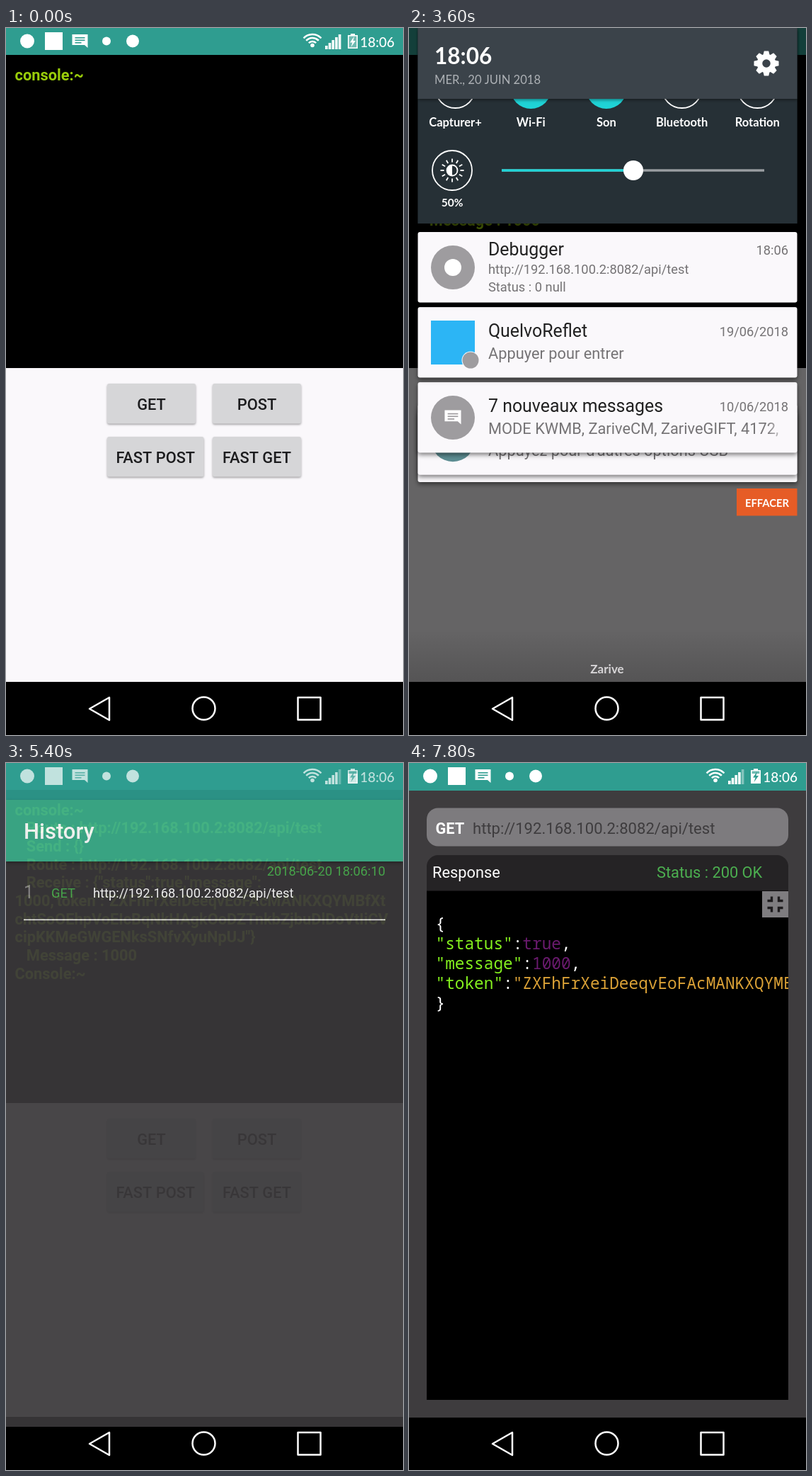
These frames come from a looping animation (561x998 px, 8 s). An HTML page with a canvas:

```html
<!DOCTYPE html>
<html lang="fr">
<head>
<meta charset="utf-8">
<title>Console</title>
<style>
html, body { margin: 0; width: 100%; height: 100%; overflow: hidden; background: #000; }
canvas { display: block; width: 100vw; height: 100vh; }
</style>
</head>
<body>
<canvas id="stage" width="561" height="998"></canvas>
<script>
const W = 561, H = 998, NAV = 923, BAR = 38;
const LOOP = 8000, STEP = 200;
const TEAL = '#2f9d90', PAPER = '#faf8fb', GREEN = '#4caf50', CYAN = '#1fd3d6', SLATE = '#3e3c3e';
const ROBOTO = 'Roboto, sans-serif', ROUND = 'Lato, sans-serif', MONO = '"Noto Sans Mono", monospace';
const URL_TEXT = 'http://192.168.100.2:8082/api/test';
const TOKEN = 'ZXFhFrXeiDeeqvEoFAcMANKXQYMBfXt';

const screen = document.getElementById('stage').getContext('2d');
const layer = document.createElement('canvas');
layer.width = W;
layer.height = H;
const layerCtx = layer.getContext('2d');
let c = screen;

const clamp = (v, a, b) => Math.max(a, Math.min(b, v));

// Linear interpolation through [time, value] pairs
function track(keys, t) {
  if (t <= keys[0][0]) return keys[0][1];
  for (let i = 1; i < keys.length; i++) {
    const [t0, v0] = keys[i - 1], [t1, v1] = keys[i];
    if (t <= t1) return v0 + (v1 - v0) * (t - t0) / (t1 - t0);
  }
  return keys[keys.length - 1][1];
}

function text(s, x, y, size, color, { weight = 400, font = ROBOTO, align = 'left' } = {}) {
  c.font = `${weight} ${size}px ${font}`;
  c.textAlign = align;
  c.fillStyle = color;
  c.fillText(s, x, y);
}

function rect(x, y, w, h, color) {
  c.fillStyle = color;
  c.fillRect(x, y, w, h);
}

function rounded(x, y, w, h, r, color) {
  c.beginPath();
  c.roundRect(x, y, w, h, r);
  c.fillStyle = color;
  c.fill();
}

function disc(x, y, r, color) {
  c.beginPath();
  c.arc(x, y, r, 0, Math.PI * 2);
  c.fillStyle = color;
  c.fill();
}

function ring(x, y, r, width, color) {
  c.beginPath();
  c.arc(x, y, r, 0, Math.PI * 2);
  c.lineWidth = width;
  c.strokeStyle = color;
  c.stroke();
}

function path(points, close) {
  c.beginPath();
  points.forEach(([x, y]) => c.lineTo(x, y));
  if (close) c.closePath();
}

function withShadow(blur, dy, alpha, draw) {
  c.save();
  c.shadowColor = `rgba(0,0,0,${alpha})`;
  c.shadowBlur = blur;
  c.shadowOffsetY = dy;
  draw();
  c.restore();
}

function clipped(x, y, w, h, draw) {
  c.save();
  c.beginPath();
  c.rect(x, y, w, h);
  c.clip();
  draw();
  c.restore();
}

function speech(x, y, s, color, lines) {
  c.save();
  c.translate(x, y);
  c.scale(s, s);
  path([[-11, -9], [11, -9], [11, 10], [6.5, 6], [-11, 6]], true);
  c.fillStyle = color;
  c.fill();
  [-5, -1.5, 2].forEach((dy, i) => rect(-7, dy, i === 2 ? 9 : 14, 1.6, lines));
  c.restore();
}

function battery(step) {
  const charged = step % 3 === 1;
  rect(487, 8, 6, 3, '#fff');
  c.lineWidth = 1.6;
  c.strokeStyle = '#fff';
  c.strokeRect(483.8, 10.8, 12.4, 17.4);
  rect(483, 10, 14, 19, 'rgba(255,255,255,.3)');
  if (charged) rect(483, 15, 14, 14, '#fff');
  path([[492, 12], [486, 20.5], [489.5, 20.5], [487.5, 27], [494, 18], [490.5, 18]], true);
  c.fillStyle = charged ? TEAL : '#fff';
  c.fill();
}

function statusIcons(t) {
  c.globalAlpha = track([[5000, 1], [5200, 0.4], [5600, 1]], t);
  disc(30, 18.5, 10, '#fff');
  rect(55, 6, 25, 25, '#fff');
  speech(104.5, 18, 1, '#fff', TEAL);
  disc(142, 18.5, 6, '#fff');
  disc(179, 18.5, 9, '#fff');

  c.strokeStyle = '#fff';
  c.lineWidth = 2.6;
  [7, 12, 17].forEach(r => {
    c.beginPath();
    c.arc(433, 26, r, -Math.PI * 0.76, -Math.PI * 0.24);
    c.stroke();
  });
  disc(433, 24.5, 2.8, '#fff');
  for (let i = 0; i < 5; i++) {
    const h = 5 + i * 4;
    rect(451 + i * 4.7, 30 - h, 3.6, h, i === 4 && t >= 200 ? 'rgba(255,255,255,.4)' : '#fff');
  }
  battery(Math.floor(t / 400));
  text('18:06', 549, 27, 19, '#fff', { font: ROUND, align: 'right', weight: 500 });
  c.globalAlpha = 1;
}

function navIcons() {
  c.strokeStyle = '#fff';
  c.lineWidth = 2.5;
  c.lineJoin = 'round';
  path([[118, 961], [146, 945], [146, 977]], true);
  c.stroke();
  c.strokeRect(412.5, 945, 32, 31.5);
  ring(279.5, 960.5, 16, 2.5, '#fff');
}

function button(label, x, y, w) {
  withShadow(3, 1.5, 0.35, () => rounded(x, y, w, 56.5, 3, '#d6d6d8'));
  text(label, x + w / 2, y + 37, 21.8, '#1c1c1e', { weight: 500, align: 'center' });
}

function mainScreen(t) {
  rect(0, 0, W, BAR, TEAL);
  rect(0, BAR, W, 442, '#000');
  rect(0, 480, W, NAV - 480, PAPER);
  const request = ['   Route : ' + URL_TEXT, '   Send : {}'];
  const reply = [
    '   Route : ' + URL_TEXT,
    '   Receive : {"status":true,"message":',
    '1000,"token":"' + TOKEN,
    'chtSoOEhpVoEIcBqNkHAgkOoDZTnkbZjbuDlDoVtIiCV',
    'cipKKMeGWGENksSNfvXyuNpUJ"}',
    '   Message : 1000',
    'Console:~'
  ];
  const lines = ['console:~'];
  if (t >= 800) lines.push(...request);
  if (t >= 1200) lines.push(...reply);
  lines.forEach((s, i) => text(s, 12.5, 73.5 + i * 25.7, 21.8, '#99cc0a', { weight: 700 }));

  button('GET', 143, 502, 125);
  button('POST', 292, 502, 125);
  button('FAST POST', 143, 577, 136.5);
  button('FAST GET', 292, 577, 125);
  if (t >= 600 && t < 1400) {
    clipped(143, 502, 125, 56.5, () =>
      disc(206, 530, 40 + (t - 600) / 8, `rgba(0,0,0,${0.13 * (1400 - t) / 800})`));
  }
}

function historyScreen(t) {
  rect(0, 0, W, NAV, '#3b393b');
  rect(0, 0, W, BAR, TEAL);
  withShadow(5, 2, 0.35, () => rect(0, BAR, W, 87, '#3eb08c'));
  text('History', 25, 93, 31, '#fff', { weight: 500 });
  text('2018-06-20 18:06:10', 536, 145, 18.3, GREEN, { align: 'right' });
  text('1', 25, 177, 25, '#8b898b');
  text('GET', 64, 176, 18.3, GREEN);
  text(URL_TEXT, 123, 176, 18.3, '#fff');
  rect(25, 206.5, 511, 1.6, '#f4f2f4');
  if (t >= 6600 && t < 7200) {
    clipped(25, 125, 511, 82, () => disc(280, 168, (t - 6400) * 0.6, 'rgba(255,255,255,.1)'));
  }
}

function json(rows) {
  const advance = 13.65;
  rows.forEach((row, i) => {
    let n = 0;
    row.forEach(([s, color]) => {
      text(s, 37.5 + n * advance, 234 + i * 28.1, 22.75, color, { font: MONO });
      n += s.length;
    });
  });
}

function shrinkIcon(x, y) {
  rect(x - 18.5, y - 18.5, 37, 37, '#7f7d80');
  c.strokeStyle = '#1e1c1e';
  c.lineWidth = 3.4;
  c.lineJoin = 'miter';
  for (const sx of [-1, 1]) for (const sy of [-1, 1]) {
    path([[x + sx * 11, y + sy * 5], [x + sx * 5, y + sy * 5], [x + sx * 5, y + sy * 11]]);
    c.stroke();
  }
}

function detailScreen(t) {
  const key = '#84f01e', value = '#6a1a6e', gold = '#d9a036', white = '#fff';
  rect(0, 0, W, NAV, SLATE);
  rect(0, 0, W, BAR, TEAL);
  rounded(25, 62.5, 511, 54, 16, '#7d7b7e');
  text('GET', 37.5, 98.5, 21.8, white, { weight: 700 });
  text(URL_TEXT, 90, 98.5, 22.1, SLATE);
  rounded(25, 129, 511, 769, [16, 16, 0, 0], '#252325');
  text('Response', 33, 161, 21.8, white);
  text('Status : 200 OK', 350, 161, 21.8, GREEN);
  if (t >= 7800) {
    clipped(25, 179.5, 511, 718.5, () => {
      rect(25, 179, 511, 720, '#000');
      json([
        [['{', white]],
        [['"status"', key], [':', white], ['true', value], [',', white]],
        [['"message"', key], [':', white], ['1000', value], [',', white]],
        [['"token"', key], [':', white], ['"' + TOKEN, gold]],
        [['}', white]]
      ]);
    });
  }
  shrinkIcon(517.5, 198.5);
}

// Activity transition: slides up while fading in
function enter(draw, t, start) {
  const age = t - start;
  if (age < 0) return;
  const done = age > 800;
  c = layerCtx;
  c.clearRect(0, 0, W, H);
  draw(t);
  c = screen;
  c.globalAlpha = done ? 1 : 1 - Math.exp(-Math.pow(age / 115, 1.2));
  c.drawImage(layer, 0, done ? 0 : Math.round(80 * Math.exp(-age / 148)));
  c.globalAlpha = 1;
}

const CARDS = [
  { title: 'Debugger', sub: [URL_TEXT, 'Status : 0 null'], date: '18:06', color: '#9e9c9f' },
  { title: 'QuelvoReflet', sub: ['Appuyer pour entrer'], date: '19/06/2018', app: true },
  { title: '7 nouveaux messages', sub: ['MODE KWMB, ZariveCM, ZariveGIFT, 4172,'], date: '10/06/2018', color: '#9e9c9f', chat: true },
  { title: 'Connecté en mode multimédia', sub: ["Appuyez pour d'autres options USB"], date: '', color: '#5c8d92' },
  { title: 'Débogage USB connecté', sub: ['Appuyez pour désactiver'], date: '', color: '#5c8d92' }
];

function card({ title, sub, date, color, app, chat }, y) {
  withShadow(6, 3, 0.5, () => rounded(12.5, y, 536, 99.5, 3, PAPER));
  const two = sub.length > 1, dy = two ? 0 : 9.5;
  if (app) {
    rect(31, y + 19, 62, 62, '#2cb5f5');
    disc(87, y + 75, 12.5, PAPER);
    disc(87, y + 75, 11.5, '#9e9c9f');
  } else {
    disc(62, y + 50, 31, color);
    if (chat) speech(62, y + 49, 1.05, '#fff', color);
    else disc(62, y + 50, 12, '#fff');
  }
  text(title, 112, y + 32.5 + dy, 24.9, '#212121');
  text(date, 536, y + 31.5 + dy, 18.3, '#757375', { align: 'right' });
  clipped(12, y, 524, 100, () => {
    if (two) sub.forEach((s, i) => text(s, 112, y + 59 + i * 25, 18.3, '#757375'));
    else text(sub[0], 112, y + 73, 21.8, '#757375');
  });
  if (chat) {
    const fade = c.createLinearGradient(505, 0, 537, 0);
    fade.addColorStop(0, 'rgba(250,248,251,0)');
    fade.addColorStop(1, PAPER);
    rect(505, y + 50, 32, 35, fade);
  }
}

function gear(x, y) {
  c.save();
  c.translate(x, y);
  for (let i = 0; i < 8; i++) {
    path([[-4.8, -11], [-3.2, -17.5], [3.2, -17.5], [4.8, -11]], true);
    c.fillStyle = '#fff';
    c.fill();
    c.rotate(Math.PI / 4);
  }
  c.restore();
  ring(x, y, 9.5, 7.5, '#fff');
}

function quickSettings(bottom) {
  const label = { font: ROUND, align: 'center', weight: 700 };
  rect(12.5, 0, 536, bottom, '#263036');
  ['Capturer+', 'Wi-Fi', 'Son', 'Bluetooth', 'Rotation'].forEach((name, i) => {
    const x = 65.5 + i * 106.7, y = bottom - 191;
    if (i === 1 || i === 2) disc(x, y, 29, CYAN);
    else ring(x, y, 28, 1.8, '#fff');
    text(name, x, bottom - 137, 16.5, '#fff', label);
  });
  const y = bottom - 75;
  ring(61, y, 28, 1.8, '#fff');
  ring(61, y, 7.5, 1.8, '#fff');
  c.beginPath();
  c.arc(61, y, 7.5, Math.PI / 2, Math.PI * 1.5);
  c.fillStyle = '#fff';
  c.fill();
  for (let i = 0; i < 12; i++) {
    const a = i * Math.PI / 6, u = Math.cos(a), v = Math.sin(a);
    path([[61 + u * 11.5, y + v * 11.5], [61 + u * 16.5, y + v * 16.5]]);
    c.lineWidth = 1.8;
    c.stroke();
  }
  text('50%', 61, bottom - 24, 15.5, '#fff', label);
  rect(131, y - 1.7, 371, 3.4, '#9a9ea2');
  rect(131, y - 1.7, 186, 3.4, CYAN);
  disc(317, y, 14, '#fff');
}

const PULL = [[2800, 0], [3000, 130], [3200, 310], [3400, 490], [3600, 644], [3800, 750], [4000, 790],
  [4400, 790], [4600, 715], [4800, 544], [5000, 250], [5200, 0]];

function shade(t) {
  const bottom = track(PULL, t);
  if (bottom <= 0) return;
  const open = clamp(bottom / 400, 0, 1);
  const panel = 276 + (bottom - 644) * 0.41;

  rect(0, 0, W, NAV, `rgba(0,0,0,${0.595 * open})`);
  const dim = c.createLinearGradient(0, 850, 0, NAV);
  dim.addColorStop(0, 'rgba(0,0,0,0)');
  dim.addColorStop(1, `rgba(0,0,0,${0.16 * open})`);
  rect(0, 850, W, NAV - 850, dim);
  text('Zarive', 280, 911, 17, `rgba(215,213,215,${open})`, { font: ROUND, align: 'center', weight: 700 });

  clipped(0, 0, W, NAV, () => {
    // Cards past the bottom edge pile up, closer together the deeper they lie
    for (let i = CARDS.length - 1; i >= 0; i--) {
      const free = panel + 12 + i * 106, limit = bottom - 99.5;
      const slack = 32 * Math.exp(-Math.max(0, free - limit) / 70);
      const y = Math.min(free, limit - slack);
      card(CARDS[i], y);
      if (i === 0 && t >= 4400) {
        clipped(12.5, y, 536, 99.5, () => disc(420, y + 50, 230 + (t - 4800) * 0.28, 'rgba(0,0,0,.04)'));
      }
    }
    rect(463, bottom + 6, 85.5, 38.5, '#e65c26');
    text('EFFACER', 506, bottom + 31.5, 14.8, '#fff', { font: ROUND, align: 'center', weight: 700 });

    withShadow(5, 2, 0.4, () => rect(12.5, 0, 536, panel, '#263036'));
    clipped(12.5, 0, 536, panel, () => quickSettings(panel));
    const top = Math.min(0, panel - 100);
    withShadow(4, 1.5, 0.4, () => rect(12.5, top, 536, 100, '#3b434a'));
    text('18:06', 36, top + 50.5, 31.5, '#fff', { font: ROUND, weight: 700 });
    text('MER., 20 JUIN 2018', 36, top + 79, 16.6, '#adb1b5', { font: ROUND });
    gear(505, top + 50);
  });
}

function render(t) {
  c = screen;
  rect(0, 0, W, H, '#000');
  mainScreen(t);
  const pulled = track(PULL, t) > 0;
  if (pulled) statusIcons(t);
  shade(t);
  enter(historyScreen, t, 5142);
  enter(detailScreen, t, 7115);
  if (!pulled) statusIcons(t);
  navIcons();
}

function tick(now) {
  const t = now % LOOP;
  render(t - t % STEP);
  requestAnimationFrame(tick);
}
requestAnimationFrame(tick);
</script>
</body>
</html>
```
